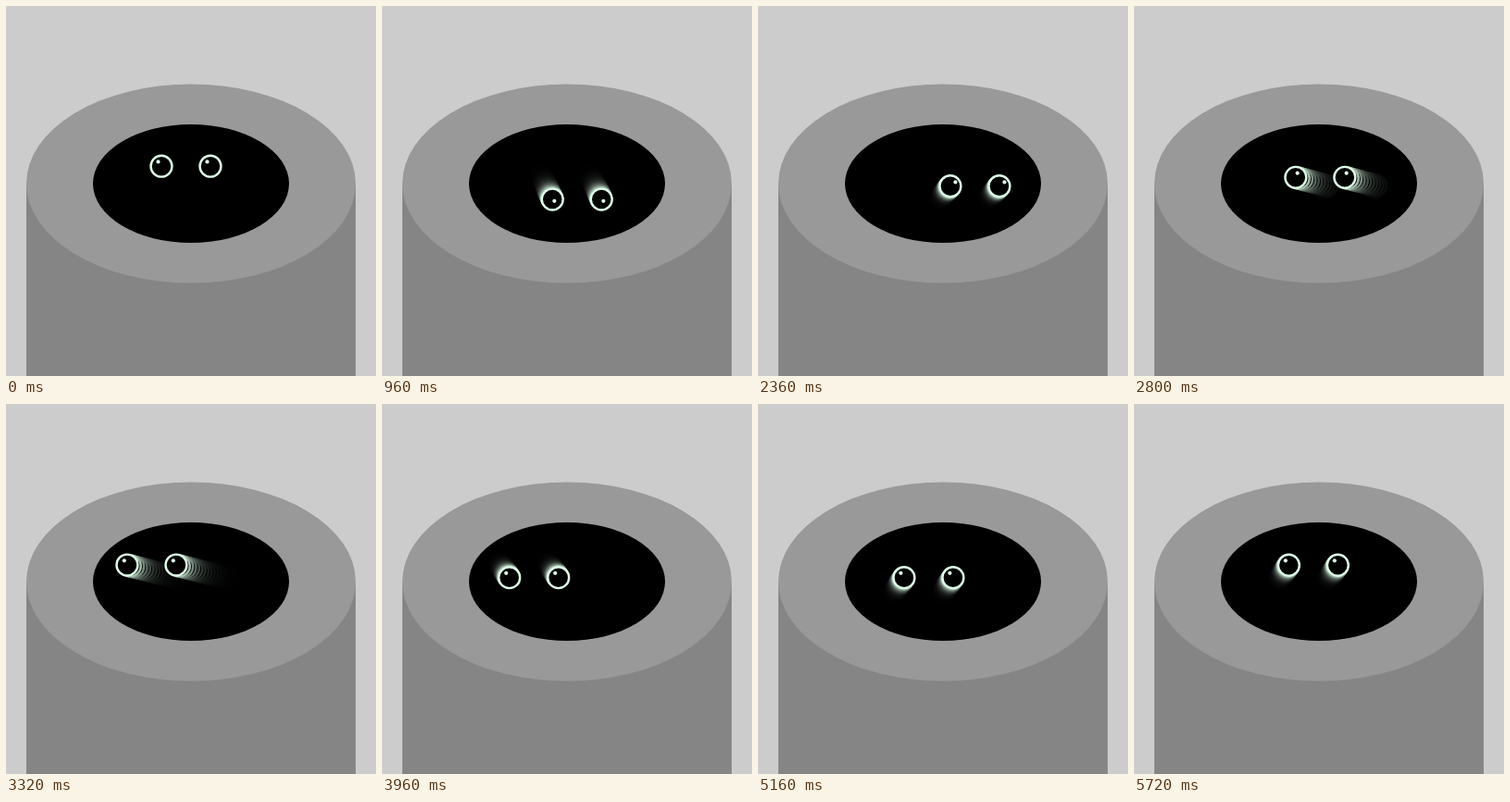
Animation of 400x400 px, one loop 5760 ms. Source, as an HTML page with a canvas:

```html
<!DOCTYPE html>
<html>
<head>
<meta charset="utf-8">
<style>
html, body { margin: 0; width: 100%; height: 100%; overflow: hidden; background: #ccc; }
canvas { display: block; }
</style>
</head>
<body>
<canvas id="stage" width="400" height="400"></canvas>
<script>
const ctx = document.getElementById('stage').getContext('2d');
const LOOP = 5760, STEP = 40, TRAIL = 18, FADE = 0.74, GAP = 53;

// Each key: time, value
const eyeX = [[0, 168], [2400, 208.6], [3360, 127.6], [LOOP, 168]];
const eyeY = [[0, 173.2], [1180, 217.3], [2400, 194], [3360, 173.2], [4560, 202.1], [LOOP, 173.2]];
const glintX = [[0, -3.5], [1200, 3.5], [2400, 5.6], [3360, -3.5], [LOOP, -3.5]];
const glintY = [[0, -4.8], [1200, 3.4], [2400, -4.6], [3360, -4.8], [LOOP, -4.8]];

function at(keys, t) {
  const i = keys.findIndex(k => k[0] > t);
  const [t0, a] = keys[i - 1], [t1, b] = keys[i];
  return a + (b - a) * (t - t0) / (t1 - t0);
}

function ellipse(x, y, rx, ry, fill) {
  ctx.beginPath();
  ctx.ellipse(x, y, rx, ry, 0, 0, 7);
  ctx.fillStyle = fill;
  ctx.fill();
}

function drawEyes(t, light) {
  const color = `rgb(${[222, 255, 232].map(c => c * light | 0)})`;
  for (const dx of [0, GAP]) {
    const x = at(eyeX, t) + dx, y = at(eyeY, t);
    ellipse(x, y, 11.45, 11.45, '#000');
    ctx.strokeStyle = color;
    ctx.lineWidth = 2.4;
    ctx.stroke();
    ellipse(x + at(glintX, t), y + at(glintY, t), 2.1, 2.1, color);
  }
}

function draw(now) {
  const t = Math.floor(now % LOOP / STEP) * STEP;
  ctx.fillStyle = '#ccc';
  ctx.fillRect(0, 0, 400, 400);
  ctx.fillStyle = '#858585';
  ctx.fillRect(22, 192, 356, 208);
  ellipse(200, 192, 178, 107.5, '#999');
  ellipse(200, 192, 106, 64, '#000');
  // Older poses lie below and fade; the trail starts fresh with each loop
  for (let k = Math.min(TRAIL, t / STEP); k >= 0; k--) drawEyes(t - k * STEP, FADE ** k);
}

const start = performance.now();
function tick() {
  draw(performance.now() - start);
  requestAnimationFrame(tick);
}
tick();
</script>
</body>
</html>
```
